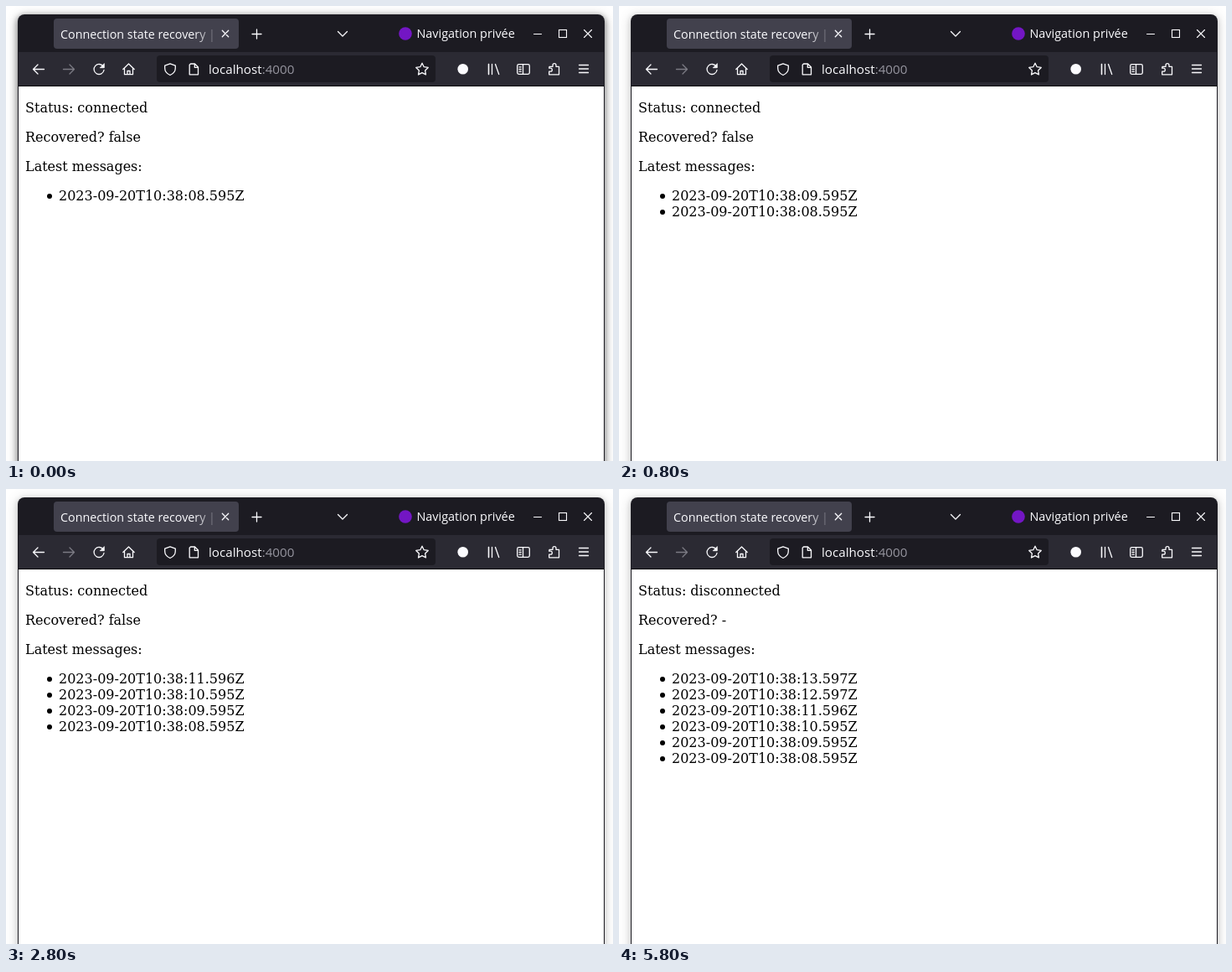
An HTML page that plays this animation: 725x543 px, repeating every 8 s.

```html
<!DOCTYPE html>
<html lang="en">
<head>
<meta charset="utf-8">
<title>Connection state recovery</title>
<style>
  html, body { margin: 0; width: 100%; height: 100%; overflow: hidden; background: #fff; }
  #stage { position: relative; width: 725px; height: 543px; overflow: hidden; background: #fff; }
  .win { position: absolute; left: 14px; top: 10px; width: 701px; height: 600px; border-radius: 8px 8px 0 0; }
  .idle { box-shadow: 0 2px 6px 1px rgba(0,0,0,.15), 0 2px 14px 3px rgba(0,0,0,.1); }
  .active { box-shadow: 0 3px 9px 1px rgba(0,0,0,.33); }
  .frame { background: #1c1b22; }
  .page { position: absolute; left: 15px; top: 96px; width: 699px; height: 447px; background: #fff;
          font: 16px/19px "DejaVu Serif", serif; color: #000; }
  .page p { margin: 16px 8px; }
  .page ul { list-style: none; margin: 16px 8px; padding: 0 0 0 40px; }
  .page li { position: relative; height: 19px; white-space: nowrap; }
  .page li::before { content: ""; position: absolute; left: -14px; top: 7px; width: 6px; height: 6px;
                     border-radius: 50%; background: #000; }
  svg { position: absolute; left: 0; top: 0; }
  .ui { font-family: "Open Sans", "Noto Sans", sans-serif; fill: #fbfbfe; }
  .line { fill: none; stroke: #fbfbfe; stroke-width: 1.3; stroke-linecap: round; stroke-linejoin: round; }
</style>
</head>
<body>
<div id="stage">
  <div class="win idle"></div>
  <div class="win active" id="glow"></div>
  <div class="win frame"></div>
  <svg width="725" height="96" viewBox="0 0 725 96">
    <defs>
      <linearGradient id="fade" gradientUnits="userSpaceOnUse" x1="225" x2="255" y1="0" y2="0">
        <stop offset="0" stop-color="#fff"/>
        <stop offset="1" stop-color="#000"/>
      </linearGradient>
      <mask id="tabMask" maskUnits="userSpaceOnUse" x="57" y="15" width="196" height="36">
        <rect x="57" y="15" width="196" height="36" fill="url(#fade)"/>
      </mask>
    </defs>

    <!-- bars -->
    <rect x="57" y="15" width="221" height="36" rx="4" fill="#42414d"/>
    <rect x="15" y="55" width="699" height="40" fill="#2b2a33"/>
    <rect x="15" y="95" width="699" height="1" fill="#0c0c0d"/>
    <rect x="180" y="59" width="333" height="32" rx="4" fill="#1c1b22"/>

    <!-- labels -->
    <g class="ui">
      <text x="65" y="39" font-size="14.3" mask="url(#tabMask)">Connection state recovery | S</text>
      <text x="490.5" y="38" font-size="14.4">Navigation privée</text>
      <text x="242" y="81" font-size="15.2">localhost<tspan fill="#96959f">:4000</tspan></text>
    </g>

    <!-- tab strip and window buttons -->
    <g class="line">
      <path d="M258.3 29.3l7.4 7.4m0-7.4l-7.4 7.4"/>
      <path d="M299.5 28v11M294 33.5h11"/>
      <path d="M396.5 30.5l5.5 5.5 5.5-5.5"/>
      <path d="M630.5 33.5h9" stroke-width="1"/>
      <rect x="660.5" y="28.5" width="9" height="9" stroke-width="1.1" stroke-linejoin="miter"/>
      <path d="M690.5 28.5l9 9m0-9l-9 9" stroke-width="1.1"/>
    </g>
    <circle cx="477" cy="33" r="7.8" fill="#7316c4"/>

    <!-- toolbar -->
    <g class="line">
      <path d="M45.5 75.5h-13M38 70l-5.5 5.5L38 81"/>
      <path d="M68.5 75.5h13M76 70l5.5 5.5-5.5 5.5" stroke="#7c7b84"/>
      <path d="M116.3 72.5A6 6 0 1 0 117 76.5"/>
      <path d="M117.3 69v4.7h-4.7z" fill="#fbfbfe" stroke-width=".8"/>
      <path d="M139.8 75.5l6.7-6.5 6.7 6.5M141.5 74.5v7.2h10v-7.2M145 81.5v-4h3v4"/>
      <path d="M196 68.8l6.3 2.3v3.2c0 3.8-2.6 6.6-6.3 8.2-3.7-1.6-6.3-4.4-6.3-8.2v-3.2z"/>
      <path d="M220.5 69h5l4 4v8.8h-10.3v-11.5zM225.3 69.3v4h4"/>
      <path id="star"/>
      <path d="M576.5 69.5v12M580.5 69.5v12M584.5 69.5l4.2 12" />
      <path d="M576.5 69.5v12" />
      <rect x="610.7" y="69.6" width="14.6" height="11.8" rx="1.8"/>
      <path d="M617.5 70v11M613 72.8h2.2M613 75.5h2.2M613 78.2h2.2"/>
      <path d="M649 72.3h4v-1.6a2 2 0 0 1 4 0v1.6h3.5v9.5h-11.8v-3.6h1.6a2 2 0 0 0 0-4h-1.6z"/>
      <path d="M684.5 70.5h11M684.5 75h11M684.5 79.5h11"/>
    </g>
    <circle cx="545.7" cy="75.3" r="6.3" fill="#fbfbfe"/>
  </svg>
  <div class="page">
    <p>Status: <span id="status"></span></p>
    <p>Recovered? <span id="recovered"></span></p>
    <p>Latest messages:</p>
    <ul id="list"></ul>
  </div>
</div>
<script>
  const LOOP = 8000, DROP = 5800;
  // arrival time on the clock, then the millisecond part of the stamp
  const messages = [[0, 595], [800, 595], [2000, 595], [2800, 596], [3800, 597], [4800, 597]];
  const $ = id => document.getElementById(id);

  function starPath(cx, cy, outer, inner) {
    const points = Array.from({ length: 10 }, (_, i) => {
      const r = i % 2 ? inner : outer, a = i * Math.PI / 5 - Math.PI / 2;
      return (cx + r * Math.cos(a)).toFixed(2) + ' ' + (cy + r * Math.sin(a)).toFixed(2);
    });
    return 'M' + points.join('L') + 'z';
  }
  $('star').setAttribute('d', starPath(497, 75.8, 7.6, 3.8));

  const items = messages.map(([at, ms], i) => {
    const li = document.createElement('li');
    li.textContent = `2023-09-20T10:38:${String(8 + i).padStart(2, '0')}.${ms}Z`;
    $('list').prepend(li);
    return { at, li };
  });

  function draw(t) {
    const online = t < DROP;
    $('glow').style.opacity = t < 100 ? 1 : t < 200 ? 0.5 : 0;
    $('status').textContent = online ? 'connected' : 'disconnected';
    $('recovered').textContent = online ? 'false' : '-';
    for (const { at, li } of items) li.style.display = t >= at ? 'block' : 'none';
  }

  const start = performance.now();
  function tick(now) {
    draw(Math.max(0, now - start) % LOOP);
    requestAnimationFrame(tick);
  }
  draw(0);
  requestAnimationFrame(tick);
</script>
</body>
</html>
```
